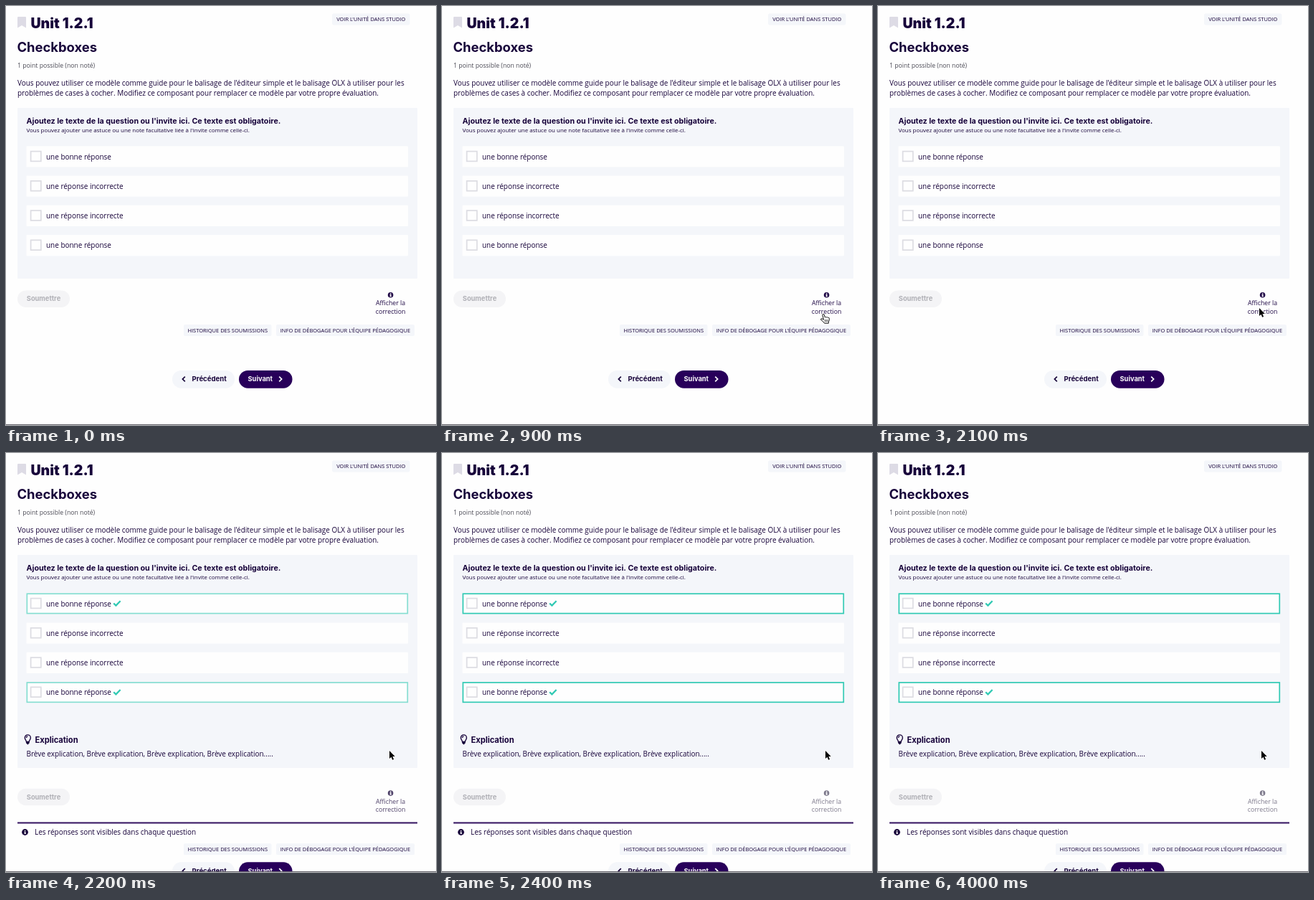
Animation, 600 px wide and 584 px high, one loop 4.1 s. Source, as an HTML page with a canvas:

```html
<!DOCTYPE html>
<html lang="fr">
<head>
<meta charset="utf-8">
<style>
  html, body { margin: 0; width: 100%; height: 100%; overflow: hidden; background: #fefefe; }
  canvas { display: block; width: 600px; height: 584px; }
</style>
</head>
<body>
<canvas id="stage"></canvas>
<script>
const LOOP = 4100, TICK = 100, REVEAL = 2200;
const INK = '#17033a', PURPLE = '#28005a', PANEL = '#f4f6fa', TEAL = '#30c9b3';
const BODY = '"Open Sans", sans-serif', HEAD = 'Inter, sans-serif';
const BODY_SIZE = 9.96;

const canvas = document.getElementById('stage');
const ratio = window.devicePixelRatio || 1;
canvas.width = 600 * ratio;
canvas.height = 584 * ratio;
const ctx = canvas.getContext('2d');

function text(str, x, y, size, { color = INK, weight = 400, family = BODY, align = 'left' } = {}) {
  ctx.font = `${weight} ${size}px ${family}`;
  ctx.fillStyle = color;
  ctx.textAlign = align;
  ctx.fillText(str, x, y);
}

function heading(str, x, y, size, options = {}) {
  text(str, x, y, size, { weight: 700, family: HEAD, ...options });
}

function box(x, y, w, h, color, radius = 0) {
  ctx.fillStyle = color;
  ctx.beginPath();
  ctx.roundRect(x, y, w, h, radius);
  ctx.fill();
}

function line(points, color, width) {
  ctx.strokeStyle = color;
  ctx.lineWidth = width;
  ctx.lineJoin = 'miter';
  ctx.lineCap = 'butt';
  ctx.beginPath();
  points.forEach(([x, y]) => ctx.lineTo(x, y));
  ctx.stroke();
}

function at(x, y, draw) {
  ctx.save();
  ctx.translate(x, y);
  draw();
  ctx.restore();
}

function mix(from, to, k) {
  return `rgb(${from.map((v, i) => Math.round(v + (to[i] - v) * k)).join(',')})`;
}

function infoIcon(x, y, r, color) {
  ctx.fillStyle = color;
  ctx.beginPath();
  ctx.arc(x, y, r, 0, 7);
  ctx.fill();
  box(x - 0.7, y - 2.6, 1.5, 1.4, '#fff');
  box(x - 1.1, y - 0.6, 1.9, 1, '#fff');
  box(x - 0.5, y - 0.6, 1.3, 2.8, '#fff');
  box(x - 1.2, y + 1.5, 2.6, 0.9, '#fff');
}

function bulbIcon(x, y) {
  at(x, y, () => {
    ctx.strokeStyle = INK;
    ctx.lineWidth = 1.4;
    ctx.stroke(new Path2D('M-1.9 3 C-1.9 1 -4 .2 -4 -2.6 A4 4 0 0 1 4 -2.6 C4 .2 1.9 1 1.9 3 Z M-2 -2.6 Q-1.8 -4.4 0 -4.6'));
    box(-2.2, 2.8, 4.4, 2.6, INK, 0.6);
    box(-1.2, 5.2, 2.4, 1.6, INK, 0.8);
  });
}

function smallButton(str, x, y, w) {
  box(x, y - 8, w, 16, PANEL, 2);
  text(str, x + w / 2, y + 2.6, 7.5, { align: 'center' });
}

function drawHeader() {
  ctx.fillStyle = '#dddbe5';
  ctx.fill(new Path2D('M16 16 Q16 15 17 15 H27 Q28 15 28 16 V30.5 L22 27 L16 30.5 Z'));
  heading('Unit 1.2.1', 34.5, 31, 19.5, { weight: 900 });
  smallButton("VOIR L'UNITÉ DANS STUDIO", 455, 18.5, 108.5);
  heading('Checkboxes', 15.5, 64, 18.4);
  text('1 point possible (non noté)', 16, 86, 8.7, { color: '#4b4a55' });
  text("Vous pouvez utiliser ce modèle comme guide pour le balisage de l'éditeur simple et le balisage OLX à utiliser pour les", 16, 111, BODY_SIZE);
  text('problèmes de cases à cocher. Modifiez ce composant pour remplacer ce modèle par votre propre évaluation.', 16, 124.5, BODY_SIZE);
}

function drawOption(row, correct, glow) {
  const y = 209.8 + row * 41.25;
  box(28.5, y - 14.6, 532.5, 29.2, '#fefefe', 1);
  ctx.strokeStyle = '#dcdce2';
  ctx.lineWidth = 1.7;
  ctx.strokeRect(34.6, y - 7.2, 14.2, 13.8);
  text(correct ? 'une bonne réponse' : 'une réponse incorrecte', 56, y + 3.7, BODY_SIZE);
  if (!correct || !glow) return;
  ctx.strokeStyle = mix([190, 234, 229], [48, 201, 179], glow);
  ctx.lineWidth = 1.7;
  ctx.strokeRect(29.3, y - 13.6, 531, 27.4);
  line([[150.2, y - 0.3], [153.4, y + 2.8], [159.6, y - 3.5]], TEAL, 2.3);
}

function drawPanel(shown, glow) {
  box(16, 142, 558, shown ? 297 : 238, PANEL, 1);
  heading("Ajoutez le texte de la question ou l'invite ici. Ce texte est obligatoire.", 28.5, 164, 10.7);
  text("Vous pouvez ajouter une astuce ou une note facultative liée à l'invite comme celle-ci.", 28.5, 175.8, 7.94);
  [true, false, false, true].forEach((correct, row) => drawOption(row, correct, glow));
  if (!shown) return;
  bulbIcon(30.3, 399.5);
  heading('Explication', 40.5, 404, 11.1);
  text(Array(4).fill('Brève explication').join(', ') + '.....', 28.5, 423.4, BODY_SIZE);
}

function drawActions(shown, fade) {
  const y = shown ? 479.5 : 408.2;
  box(16, y - 11.7, 73, 23.4, '#f4f4f6', 11.7);
  heading('Soumettre', 52.5, y + 3.2, 9.3, { color: '#b0b0b6', align: 'center' });
  const color = mix([34, 12, 72], [126, 122, 140], fade);
  infoIcon(536.6, y - 5.4, 3.8, color);
  text('Afficher la', 536.6, y + 9, 8.8, { color, align: 'center' });
  text('correction', 536.6, y + 20.6, 8.8, { color, align: 'center' });
  if (shown) {
    box(16, 514.5, 558, 2, '#32105f');
    infoIcon(26.5, 528.5, 4.4, INK);
    text('Les réponses sont visibles dans chaque question', 40, 532, BODY_SIZE);
  }
}

function drawFooter(shown) {
  const y = shown ? 552.2 : 452;
  smallButton('HISTORIQUE DES SOUMISSIONS', 248, y, 122.5);
  smallButton("INFO DE DÉBOGAGE POUR L'ÉQUIPE PÉDAGOGIQUE", 377, y, 193);
  const nav = shown ? 582.7 : 520.3;
  box(232, nav - 12.4, 87, 24.8, PANEL, 12.4);
  box(325, nav - 12.4, 74.5, 24.8, PURPLE, 12.4);
  line([[249.8, nav - 3.6], [246.4, nav - 0.3], [249.8, nav + 3]], INK, 1.7);
  heading('Précédent', 259.5, nav + 2.9, 9.6);
  heading('Suivant', 337.5, nav + 2.9, 9.3, { color: '#fff' });
  line([[381.2, nav - 3.6], [384.6, nav - 0.3], [381.2, nav + 3]], '#fff', 1.7);
  box(0, 583, 600, 1, '#68666d');
}

function paintCursor(shape) {
  ctx.lineJoin = 'round';
  ctx.lineWidth = 1.6;
  ctx.strokeStyle = '#fff';
  ctx.stroke(shape);
  ctx.fillStyle = '#000';
  ctx.fill(shape);
}

function arrow(x, y) {
  at(x, y, () => paintCursor(new Path2D('M0 0 V11 L2.5 8.7 L4.2 12.7 L6.1 11.9 L4.4 8 H7.8 Z')));
}

function hand(x, y) {
  at(x, y, () => {
    ctx.lineJoin = ctx.lineCap = 'round';
    ctx.lineWidth = 1;
    ctx.fillStyle = '#fff';
    ctx.strokeStyle = '#111';
    const palm = new Path2D('M0 1 Q1.1 -.6 2.2 1 L3.2 4.8 Q4.4 3.8 5.3 5 Q6.6 4.1 7.4 5.3 Q8.9 4.6 9.3 6.2 Q9.8 9 8.4 11.2 V13.2 H2.6 Q1.4 10.8 -2.3 8.4 Q-2.9 6.7 -1 6.8 L1.2 8 Z');
    ctx.fill(palm);
    ctx.stroke(palm);
    ctx.lineWidth = 0.7;
    ctx.stroke(new Path2D('M3.4 8.3 V11 M5.2 8.3 V11 M7 8.3 V11'));
  });
}

const path = [
  { t: 300, x: 592, y: 492 },
  { t: 400, x: 566, y: 466 },
  { t: 500, x: 542, y: 450 },
  { t: 600, x: 529, y: 439 },
  { t: 900, x: 531, y: 429 },
  { t: 1400, x: 530, y: 425 },
  { t: 2000, x: 530, y: 425 },
  { t: 2100, x: 532, y: 421 },
  { t: 2200, x: 535, y: 415 }
];

function drawCursor(t) {
  if (t < path[0].t) return;
  const next = path.findIndex(p => p.t > t);
  let { x, y } = path.at(-1);
  if (next > 0) {
    const a = path[next - 1], b = path[next];
    const k = (t - a.t) / (b.t - a.t);
    x = a.x + (b.x - a.x) * k;
    y = a.y + (b.y - a.y) * k;
  }
  (t >= 600 && t < 2100 ? hand : arrow)(x, y);
}

function render(t) {
  const shown = t >= REVEAL;
  const progress = Math.min(1, Math.max(0, (t - REVEAL) / 200));
  ctx.setTransform(ratio, 0, 0, ratio, 0, 0);
  box(0, 0, 600, 584, '#fefefe');
  drawHeader();
  drawPanel(shown, shown ? 0.4 + 0.6 * progress : 0);
  drawActions(shown, shown ? 0.5 + 0.5 * progress : 0);
  drawFooter(shown);
  drawCursor(t);
}

const start = performance.now();
function tick() {
  const t = (performance.now() - start) % LOOP;
  render(Math.floor(t / TICK) * TICK);
  requestAnimationFrame(tick);
}
tick();
</script>
</body>
</html>
```
